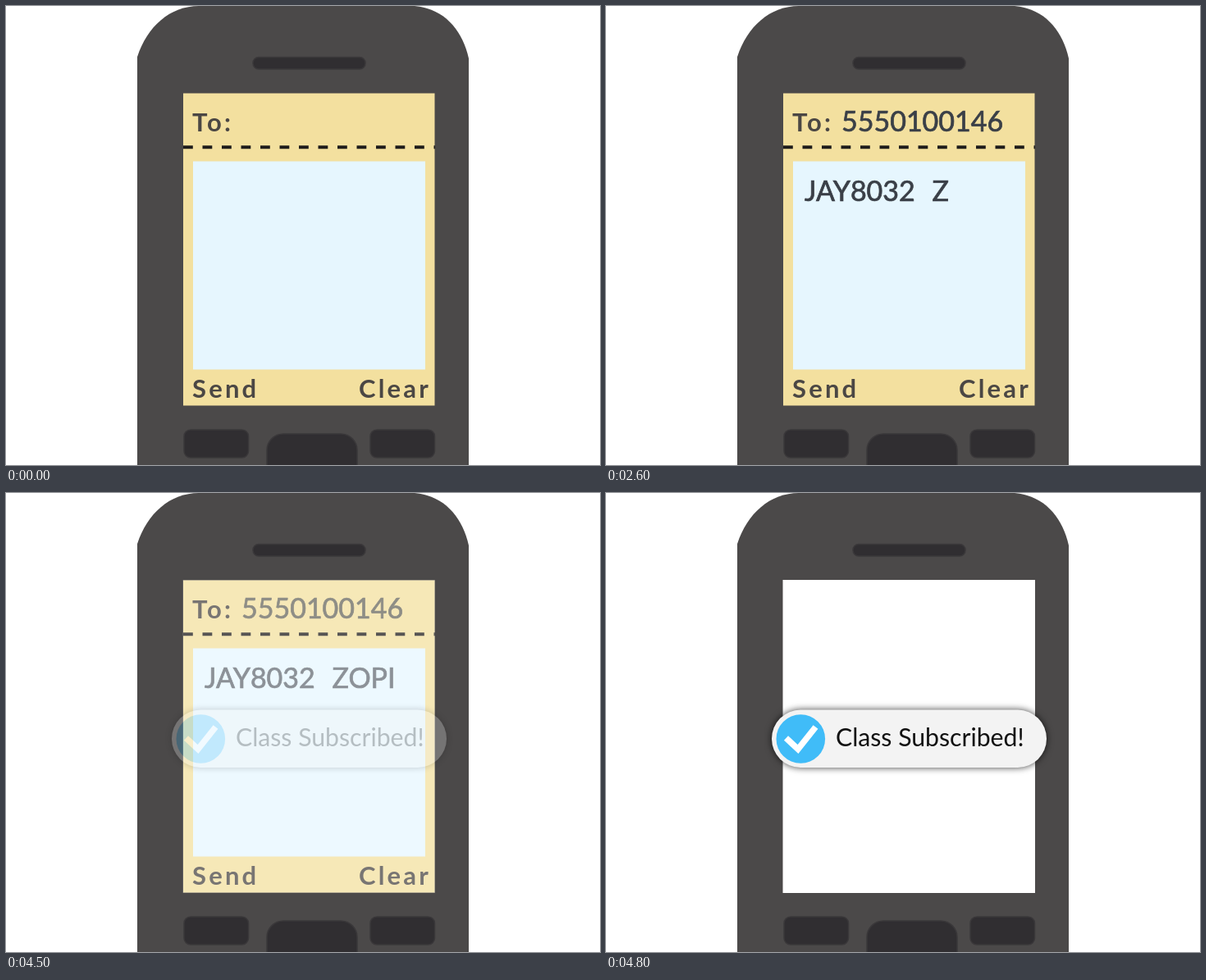
Recreate the animation shown at these times as an HTML page. Size 724x560 px, loop 6.8 s.

```html
<!DOCTYPE html>
<html lang="en">
<head>
<meta charset="utf-8">
<title>Text message</title>
<style>
  html, body { margin: 0; width: 100%; height: 100%; overflow: hidden; background: #fff; }
  svg { display: block; width: 724px; height: 560px; }
  text { font-family: Lato, sans-serif; white-space: pre; }
  .label { font-size: 31px; font-weight: 700; letter-spacing: 3.2px; fill: #4b4744; }
  .typed { font-size: 34px; fill: #3a3f47; stroke: #3a3f47; stroke-width: .7px; }
  .key { fill: #302e31; stroke: #3a383a; stroke-width: 1.5; }
  #badge { filter: drop-shadow(0 0 4px rgba(0, 0, 0, .75)); }
</style>
</head>
<body>
<svg viewBox="0 0 724 560">
  <path fill="#4b4949" d="M160 560V62C172 25 200 0 235 0H498C533 3 556 28 564 64V560Z"/>
  <rect class="key" x="301" y="62.5" width="137" height="14.5" rx="7"/>
  <rect class="key" x="217" y="517" width="78.5" height="34" rx="8"/>
  <rect class="key" x="444" y="517" width="78.5" height="34" rx="8"/>
  <rect class="key" x="318" y="522" width="110" height="60" rx="20"/>

  <rect x="216" y="106.5" width="306.5" height="381" fill="#f3e09f"/>
  <path d="M216 172.3H523" stroke="#1e1c1b" stroke-width="4" stroke-dasharray="11.8 11.7"/>
  <rect x="228" y="189.5" width="283" height="254" fill="#e6f6fe"/>
  <text class="label" x="227" y="153">To:</text>
  <text class="label" x="227" y="478">Send</text>
  <text class="label" x="430" y="478">Clear</text>
  <g id="message">
    <text class="typed" id="number" x="287" y="153"></text>
    <text class="typed" id="code" x="242" y="238"></text>
    <text class="typed" id="name" x="397.5" y="238"></text>
  </g>
  <circle id="tap" cx="264" cy="470" fill="#fff"/>

  <rect id="cover" x="215.5" y="106" width="307.5" height="382" fill="#fff"/>
  <g id="badge">
    <rect x="202" y="264.5" width="335" height="70.5" rx="35.2" fill="#f3f3f3"/>
    <circle cx="237.3" cy="300" r="29.8" fill="#40bcf8"/>
    <path d="M219.5 299L234 312.5L255.5 285.5" fill="none" stroke="#fff" stroke-width="7.5"/>
    <text x="280" y="309" font-size="30.2" fill="#111">Class Subscribed!</text>
  </g>
</svg>
<script>
  const LOOP = 6800, STEP = 100;
  const el = id => document.getElementById(id);
  const clamp = (v, max) => Math.max(0, Math.min(max, v));
  const stepsSince = (t, start) => Math.floor((t - start) / STEP) + 1;

  const typing = [
    ['number', '5550100146', 100],
    ['code', 'JAY8032', 1500],
    ['name', 'ZOPI', 2600],
  ];

  function draw(t) {
    for (const [id, string, start] of typing)
      el(id).textContent = string.slice(0, clamp(stepsSince(t, start), string.length));

    // Ripple on Send
    const ripple = clamp(stepsSince(t, 3400) - 1, 6) / 6;
    el('tap').setAttribute('r', 40 * Math.sqrt(ripple));
    el('tap').setAttribute('opacity', .5 * (1 - ripple));

    // Confirmation fades in over the screen
    const fade = clamp(stepsSince(t, 4500), 4) / 4;
    el('message').setAttribute('opacity', 1 - fade);
    el('cover').setAttribute('opacity', fade);
    el('badge').setAttribute('opacity', fade);
  }

  const origin = performance.now();
  function tick() {
    draw((performance.now() - origin) % LOOP);
    requestAnimationFrame(tick);
  }
  tick();
</script>
</body>
</html>
```
